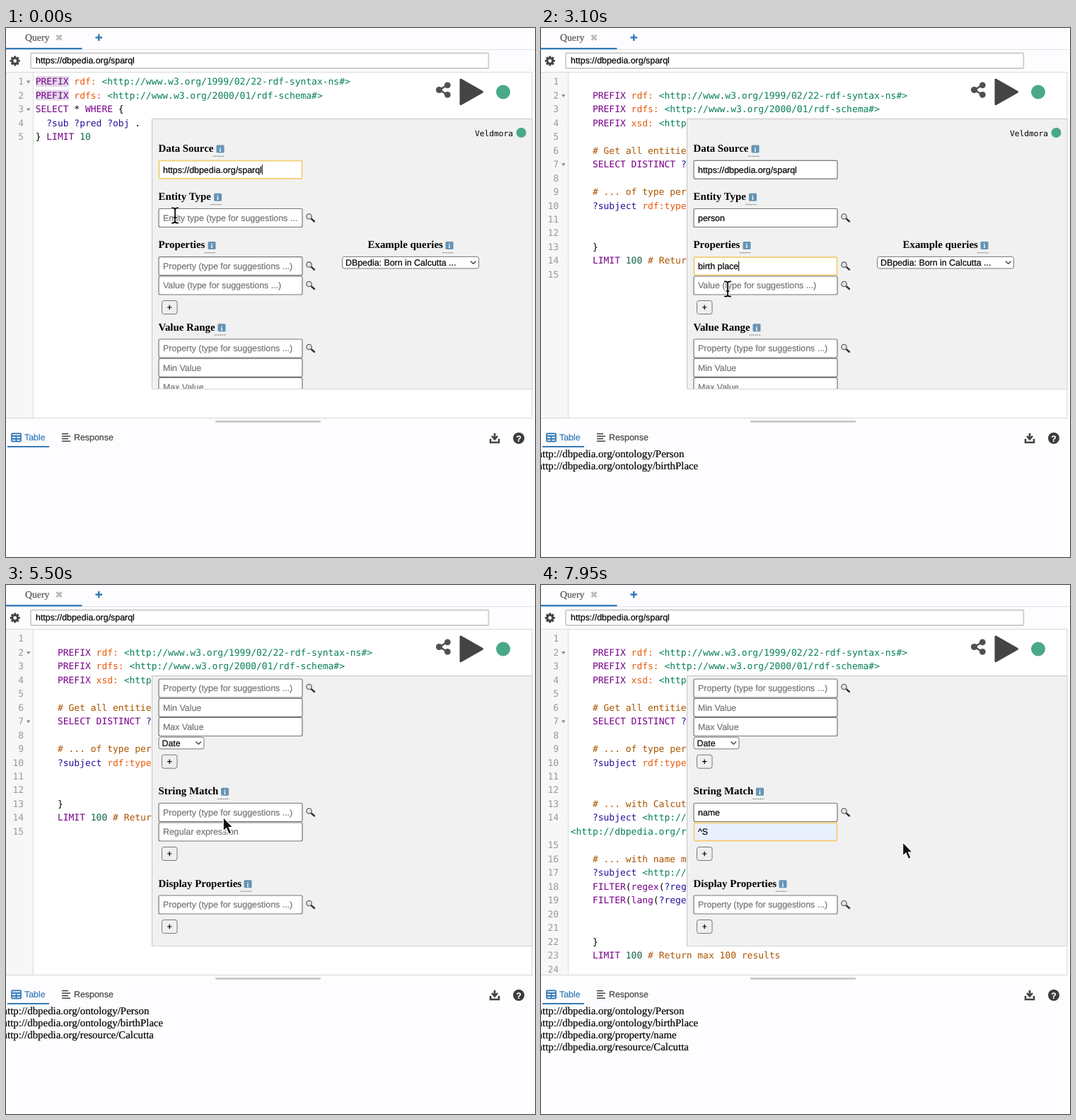
Recreate the animation shown at these times as an HTML page. Size 748 by 748 pixels, loop 8000 ms.

```html
<!DOCTYPE html>
<html lang="en">
<head>
<meta charset="utf-8">
<title>Query editor</title>
<style>
html, body { margin: 0; width: 100%; height: 100%; overflow: hidden; background: #fdfcfe; }
svg { display: block; width: 100vw; height: 100vh; }
text { white-space: pre; text-rendering: geometricPrecision; }
.sans { font: 12.4px "Liberation Sans", Arial, sans-serif; }
.serif { font: 14.9px "Liberation Serif", Times, serif; }
.head { font: bold 14.9px "Liberation Serif", Times, serif; }
.mono { font: 12.97px "DejaVu Sans Mono", Menlo, monospace; }
.sans, .serif { stroke-width: .2px; }
.key { fill: #770088; } .name { fill: #e8590c; } .uri { fill: #088055; }
.var { fill: #221199; } .num { fill: #116644; } .note { fill: #aa5500; }
</style>
</head>
<body>
<svg viewBox="0 0 748 748" xmlns="http://www.w3.org/2000/svg">
  <defs>
    <clipPath id="panelClip"><rect x="206" y="128" width="538" height="382.5"/></clipPath>
    <clipPath id="listClip"><rect width="540" height="187"/></clipPath>
    <filter id="soft" x="-5%" y="-5%" width="110%" height="115%"><feDropShadow dx="0" dy="1" stdDeviation="2" flood-opacity=".18"/></filter>
  </defs>
  <g id="frame"></g>
  <g id="code"></g>
  <g id="panel"></g>
  <g id="results"></g>
  <g id="list"></g>
  <g id="cursor"></g>
</svg>
<script>
const LOOP = 8000, ROW = 19.47, BLUE = '#337ab7', LEAF = '#4aa88a';
const layer = id => document.getElementById(id);
const esc = s => s.replace(/&/g, '&amp;').replace(/</g, '&lt;').replace(/>/g, '&gt;');
// A hairline stroke gives proportional text its slightly heavy look
const text = (x, y, s, cls, fill = '#000', more = '') =>
  `<text x="${x}" y="${y}" class="${cls}" fill="${fill}" ${/sans|serif/.test(cls) ? `stroke="${fill}"` : ''} ${more}>${esc(s)}</text>`;
const rect = (x, y, w, h, fill, stroke = 'none', r = 0, sw = 1) =>
  `<rect x="${x}" y="${y}" width="${w}" height="${h}" fill="${fill}" stroke="${stroke}" stroke-width="${sw}" rx="${r}"/>`;
const path = (d, stroke, w = 1, fill = 'none', more = '') =>
  `<path d="${d}" stroke="${stroke}" stroke-width="${w}" fill="${fill}" ${more}/>`;
const dot = (x, y, r, fill) => `<circle cx="${x}" cy="${y}" r="${r}" fill="${fill}"/>`;

// ---- Fixed page furniture
function drawFrame() {
  const teeth = [0, 45, 90, 135].map(a =>
    `<rect x="-1.6" y="-7" width="3.2" height="14" rx=".6" transform="rotate(${a})"/>`).join('');
  return text(27, 18, 'Query', 'serif', '#555', 'style="font-size:13.8px"')
    + path('M71.5 10l7 7m0-7l-7 7', '#bbb', 3)
    + path('M126.5 13.5h9.5m-4.75-4.75v9.5', BLUE, 2.4)
    + path('M0 30.5H748', '#e2e2e4') + rect(0, 28, 107.5, 2.2, BLUE)
    + `<g transform="translate(12.7 46.5)" fill="#444">${teeth}<circle r="5.2"/><circle r="2.4" fill="#fdfcfe"/></g>`
    + rect(35, 35.5, 647.3, 21.5, '#fff', '#cdcdcd', 1, 1.8)
    + text(42, 50.2, 'https://dbpedia.org/sparql', 'sans')
    + rect(-2, 62.5, 746, 489, '#fff', '#d8d8d8') + rect(0, 63, 38, 488, '#f7f7f7')
    + path('M38.5 63V551', '#ddd')
    + rect(296, 555, 149, 3, '#ccc', 'none', 1)
    + rect(8, 573.5, 13, 11, 'none', BLUE, 1, 1.8) + path('M8 577h13M8 581h13M14.5 576v9', BLUE, 1.8)
    + text(26, 582.8, 'Table', 'sans', BLUE) + rect(2, 591, 59, 2, BLUE)
    + path('M79 573.7h9M79 577.2h12M79 580.7h9M79 584.2h12', '#444', 1.5)
    + text(96, 582.8, 'Response', 'sans', '#444')
    + path('M691 573v7m-4-3l4 4.5 4-4.5', '#444', 2.6)
    + path('M685 581v5h12v-5', '#444', 2.6)
    + dot(725, 580, 8, '#3c3c3c')
    + text(725, 584.6, '?', 'sans', '#fff', 'text-anchor="middle" style="font-weight:bold"')
    + path('M624 80.5L613 87.5 624 94.5', '#505050', 2.6)
    + dot(612.5, 87.5, 4.6, '#505050') + dot(624.3, 80.8, 4.4, '#505050') + dot(624.3, 94.3, 4.4, '#505050')
    + path('M643 73V107.8L673.4 90.4Z', '#444', 3, '#444', 'stroke-linejoin="round"')
    + dot(703, 90.5, 10, LEAF);
}

// ---- Editor text
const W3 = 'http://www.w3.org/';
const PREFIXES = [`PREFIX rdf: <${W3}1999/02/22-rdf-syntax-ns#>`, `PREFIX rdfs: <${W3}2000/01/rdf-schema#>`];
const START = [...PREFIXES, 'SELECT * WHERE {', '  ?sub ?pred ?obj .', '} LIMIT 10'];
const PERSON = ['', ...PREFIXES, `PREFIX xsd: <${W3}2001/XMLSchema#>`, '', '# Get all entities',
  'SELECT DISTINCT ?subject', '', '# ... of type person', '?subject rdf:type ?type', '', ''];
const PLACE = ['# ... with Calcutta as birth place',
  '?subject <http://dbpedia.org/', '~<http://dbpedia.org/resource/Calcutta> .', ''];
const NAME = ['# ... with name match', '?subject <http://dbpedia.org/', 'FILTER(regex(?regex0))', 'FILTER(lang(?regex0))', '', ''];
const END = ['}', 'LIMIT 100 # Return max 100 results', ''];
const PROGRAMS = [
  { at: 0, rows: START, folds: [1, 3], indent: '' },
  { at: 1500, rows: [...PERSON, ...END] },
  { at: 5600, rows: [...PERSON, ...PLACE, '', ...END] },
  { at: 7350, rows: [...PERSON, ...PLACE, ...NAME, ...END] }
];
const TOKEN = /(<[^>]*>?)|(#.*)|(\?\w+)|(\b[a-z]+:\w*)|(\b(?:PREFIX|SELECT|DISTINCT|WHERE|LIMIT|FILTER|regex|lang)\b)|(\b\d+\b)/g;
const KINDS = ['uri', 'note', 'var', 'name', 'key', 'num'];

function paint(line) {
  let out = '', last = 0;
  for (const m of line.matchAll(TOKEN)) {
    const kind = KINDS[m.slice(1).findIndex(Boolean)];
    out += esc(line.slice(last, m.index)) + `<tspan class="${kind}">${esc(m[0])}</tspan>`;
    last = m.index + m[0].length;
  }
  return out + esc(line.slice(last));
}

function drawCode({ at, rows, folds = [2, 7], indent = '    ' }, t) {
  let out = '', number = 0;
  rows.forEach((row, i) => {
    const y = 75.5 + i * ROW, wrapped = row[0] === '~';
    if (!wrapped) {
      number++;
      out += text(25, y + 4.8, String(number), 'mono', '#999', 'text-anchor="end"');
      if (folds.includes(number) && (at === 0 || t > at + 420))
        out += path(`M29 ${y - 1}h5.4l-2.7 4z`, 'none', 0, '#888');
    }
    if (at === 0 && i < 2) out += rect(42, y - 7.5, 47, 15, '#e2d9e8');
    out += `<text x="41.7" y="${y + 4.8}" class="mono">${paint(wrapped ? row.slice(1) : indent + row)}</text>`;
  });
  return out;
}

// ---- Form panel; y values are centres in the unscrolled form
const HINT = ' (type for suggestions ...)';
const HEADS = [
  ['Data Source', 170, 303], ['Entity Type', 238.3, 299.5], ['Properties', 306.5, 291],
  ['Example queries', 306.5, 627, 511.5], ['Value Range', 422.7, 305],
  ['String Match', 598.2, 309.5], ['Display Properties', 728.8, 342]
];
const FIELDS = [
  { y: 200.3, from: -1, value: 'https://dbpedia.org/sparql', focus: [0, 150] },
  { y: 268.5, hint: 'Entity type (type for suggestions ...', lens: 1, value: 'person', from: 250, to: 600, focus: [150, 1500] },
  { y: 336.7, hint: 'Property' + HINT, lens: 1, value: 'birth place', from: 1850, to: 2400, focus: [1500, 3250] },
  { y: 364, hint: 'Value' + HINT, lens: 1, value: 'Calcutta', from: 3400, to: 3850, focus: [3250, 5600] },
  { y: 453, hint: 'Property' + HINT, lens: 1 },
  { y: 480.3, hint: 'Min Value' },
  { y: 507.5, hint: 'Max Value' },
  { y: 628.5, hint: 'Property' + HINT, lens: 1, value: 'name', from: 5750, to: 6050, focus: [5600, 6950] },
  { y: 656, hint: 'Regular expression', value: '^S', from: 7150, to: 7300, focus: [6950, LOOP], tint: 7350 },
  { y: 759, hint: 'Property' + HINT, lens: 1 }
];
const PLUSES = [395, 556.7, 687, 790];

const typed = ({ value, from, to }, t) => value === undefined || t < from ? ''
  : from < 0 ? value : value.slice(0, 1 + Math.floor((t - from) / (to - from) * (value.length - 1)));

const meter = document.createElement('canvas').getContext('2d');
meter.font = '12.4px "Liberation Sans", Arial, sans-serif';

function lens(x, y) {
  return path(`M${x + 1.5} ${y + 1.5}L${x + 5.5} ${y + 5}`, '#333', 2.4, 'none', 'stroke-linecap="round"')
    + `<circle cx="${x - 2}" cy="${y - 2}" r="3.7" fill="#dfe8ec" stroke="#666" stroke-width="1.3"/>`;
}

function drawField(f, t) {
  const { y } = f, value = typed(f, t), focused = f.focus && t >= f.focus[0] && t < f.focus[1];
  const tinted = f.tint && t >= f.tint;
  const fill = tinted ? '#e8f0fe' : '#fff';
  let out = (focused ? rect(216.5, y - 12.6, 202, 25.2, fill, '#f3cd70', 1.5, 1.7)
                     : rect(216, y - 13, 203, 26, fill, '#777', 2, 1.2))
    + text(222, y + 4.2, value || f.hint, 'sans', value ? '#000' : '#757575');
  if (focused && !tinted) {
    const x = 222.5 + meter.measureText(value).width;
    out += path(`M${x} ${y - 7}v14`, '#000');
  }
  return out + (f.lens ? lens(430.5, y) : '');
}

function drawHead([label, y, icon, x = 215.5]) {
  return text(x, y + 4.8, label, 'head')
    + rect(icon - 5.5, y - 4.5, 11, 11, '#6593b5', 'none', 1.5)
    + text(icon, y + 4.8, 'i', 'head', '#fff', 'text-anchor="middle" style="font-size:10px"')
    + path(`M${icon - 10} ${y + 11.3}h16`, '#444', 1, 'none', 'stroke-dasharray="1.3 1.3"');
}

function drawSelect(x, y, w, label) {
  return rect(x, y - 8.3, w, 16.6, '#fff', '#777', 3)
    + text(x + 4.5, y + 4.2, label, 'sans')
    + path(`M${x + w - 11.5} ${y - 2}l3.7 3.7 3.7-3.7`, '#333', 1.3);
}

function drawPlus(y) {
  return rect(220.5, y - 9.5, 21.5, 19, '#efefef', '#777', 3) + path(`M228 ${y}h6.4m-3.2-3.2v6.4`, '#000', 1.2);
}

function drawPanel(t, scroll) {
  return rect(206, 128, 538, 382.5, '#f1f1f1')
    + `<g clip-path="url(#panelClip)"><g transform="translate(0 ${-scroll})">`
    + text(663, 152.5, 'Veldmora', 'mono', '#000', 'style="font-size:11.2px"') + dot(728.5, 148, 7, LEAF)
    + HEADS.map(drawHead).join('') + FIELDS.map(f => drawField(f, t)).join('')
    + PLUSES.map(drawPlus).join('')
    + drawSelect(475.5, 331.7, 193, 'DBpedia: Born in Calcutta ...') + drawSelect(216, 530.5, 64, 'Date')
    + '</g></g>' + path('M206.5 510.5V128.5H744', '#c4c4c4') + path('M206 510.5H744V128', '#d4d4d4');
}

// ---- Suggestions
const LISTS = [
  { field: 1, show: 400, hide: 850, items: ['person', 'personal event', 'person function', 'comics person', 'business person', 'religious person'] },
  { field: 2, show: 2000, hide: 2750, items: ['birth place', 'birthplace', 'place of birth', 'birth date', 'birth name', 'birth year'] },
  { field: 3, show: 3550, hide: 4200, items: ['Calcutta', 'Calcutta High Court', 'Calcutta district', 'Calcutta University', 'Port of Calcutta', 'South Calcutta'] },
  { field: 7, show: 5900, hide: 6550, items: ['name', 'altname', 'birth name', 'birthname', 'cabinet name', 'filename'] }
];

function drawList(t, scroll) {
  const list = LISTS.find(l => t >= l.show && t < l.hide);
  if (!list) return '';
  const top = FIELDS[list.field].y - scroll + 14.5;
  const items = list.items.map((s, i) => {
    const y = 17 + i * 32.85;
    return text(12, y + 4.6, s, 'serif') + path(`M0 ${y + 16.4}H540`, '#ececec');
  }).join('');
  return `<g transform="translate(216 ${top})"><g filter="url(#soft)">${rect(0, 0, 540, 187, '#fff', '#ccc')}</g>
    <g clip-path="url(#listClip)">${items}</g></g>`;
}

// ---- Chosen addresses, kept in sorted order
const RESULTS = [[850, 'ontology/Person'], [2750, 'ontology/birthPlace'], [6550, 'property/name'], [4200, 'resource/Calcutta']];
const drawResults = t => RESULTS.filter(r => t >= r[0])
  .map((r, i) => text(-5.4, 607 + i * 17, 'http://dbpedia.org/' + r[1], 'serif')).join('');

// ---- Pointer: time, x, y, shape until the next step (beam, arrow or '' while typing)
const POINTER = [
  [0, 239, 265, 'beam'], [200, 239, 266, ''], [650, 239, 272, 'arrow'], [850, 246, 298, 'arrow'],
  [1000, 248, 302, 'arrow'], [1400, 259, 338, 'beam'], [1800, 259, 338, ''], [2450, 259, 342, 'arrow'],
  [2700, 263, 367, 'arrow'], [2850, 264, 369, 'beam'], [3350, 264, 369, ''], [3900, 264, 374, 'arrow'],
  [4200, 268, 396, 'arrow'], [4600, 277, 407, 'arrow'], [4900, 388, 401, 'arrow'], [5300, 388, 401, 'arrow'],
  [5520, 300, 322, 'beam'], [5700, 300, 322, ''], [6300, 298, 327, 'arrow'], [6500, 290, 352, 'arrow'],
  [6800, 288, 349, 'beam'], [7100, 288, 349, ''], [7350, 290, 372, 'arrow'], [7750, 512, 364, 'arrow']
];
const SCROLL = [[4680, 0], [5100, 187], [5350, 307]];

// Linear reading of a column in a table of timed steps
function along(steps, t, col) {
  const i = steps.findIndex(s => s[0] > t);
  if (i === 0) return steps[0][col];
  if (i < 0) return steps.at(-1)[col];
  const a = steps[i - 1], b = steps[i];
  return a[col] + (b[col] - a[col]) * (t - a[0]) / (b[0] - a[0]);
}

function drawCursor(t) {
  const shape = POINTER.findLast(s => s[0] <= t)[3];
  if (!shape) return '';
  const d = shape === 'beam'
    ? 'M-5 -10.5Q0 -11 0 -8Q0 -11 5 -10.5M0 -8V8M-5 10.5Q0 11 0 8Q0 11 5 10.5M-2.5 3H2.5'
    : 'M-.5 -.5V19.4L4 15.3 7.5 23.4 11.2 21.8 7.7 14H13.6Z';
  const drawn = shape === 'beam' ? path(d, '#fff', 3.4) + path(d, '#000', 1.7) : path(d, '#fff', 1.4, '#111');
  return `<g transform="translate(${along(POINTER, t, 1)} ${along(POINTER, t, 2)})">${drawn}</g>`;
}

const shown = {};
function put(id, markup) {
  if (shown[id] !== markup) layer(id).innerHTML = shown[id] = markup;
}

function render(t) {
  const scroll = along(SCROLL, t, 1);
  put('code', drawCode(PROGRAMS.findLast(p => p.at <= t), t));
  put('panel', drawPanel(t, scroll));
  put('results', drawResults(t));
  put('list', drawList(t, scroll));
  put('cursor', drawCursor(t));
}

put('frame', drawFrame());
const begin = performance.now();
function tick() {
  render((performance.now() - begin) % LOOP);
  requestAnimationFrame(tick);
}
tick();
</script>
</body>
</html>
```
